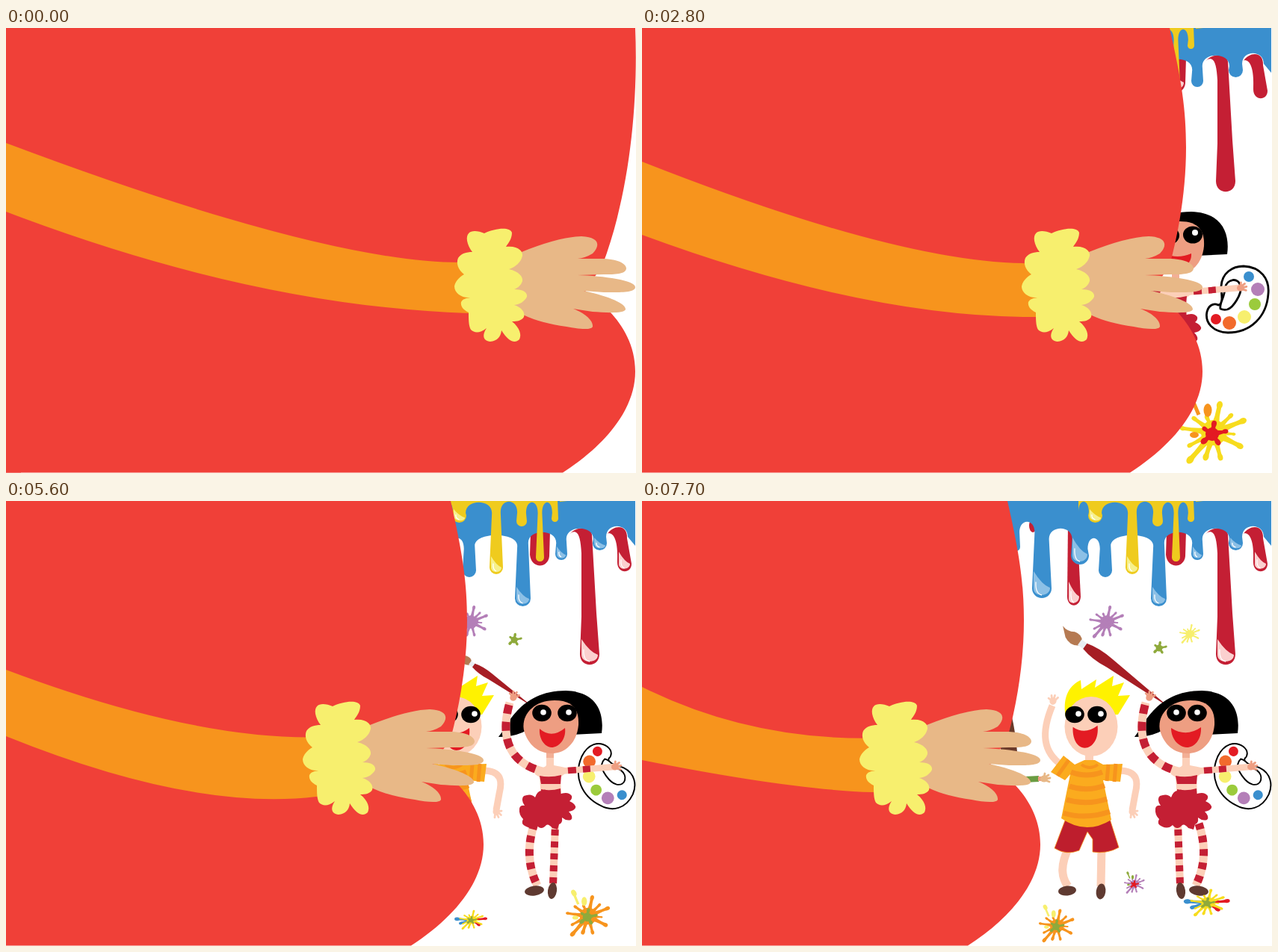
Recreate the animation shown at these times as an HTML page. Size 843 by 596 pixels, loop 8000 ms.

```html
<!DOCTYPE html>
<html lang="en">
<head>
<meta charset="utf-8">
<title>Paint party</title>
<style>
  html, body { margin: 0; width: 100%; height: 100%; overflow: hidden; background: #fff; }
  svg { display: block; width: 843px; height: 596px; }
</style>
</head>
<body>
<svg id="stage" viewBox="0 0 843 596"></svg>
<script>
const STEP = 700, LOOP = 8000;
const RED = '#c41f34', PINK = '#fccfb8', SKIN = '#ee9e82', BROWN = '#5f3a31';
const BLUE = '#3a8fce', YELLOW = '#efcb1e', ORANGE = '#f7941d', LEMON = '#f7ef6e';
const PURPLE = '#b47fb8', GREEN = '#8faa3c', LIP = '#e31b23', SUN = '#f7dc1e';

const shifts = [0, -30, -60, -92, -92, -155, -155, -203, -203, -253, -281, -309];
// Sleeve per shift: top y, top bend x, bottom y, bottom bend x and y, bottom end y
const sleeves = {
  0: [154, 425, 246, 330, 372, 382],
  30: [159, 400, 255, 315, 376, 383],
  60: [165, 375, 264, 300, 380, 384],
  92: [179, 345, 277, 300, 388, 387],
  155: [205, 285, 301, 290, 412, 391],
  203: [226, 240, 315, 250, 416, 396],
  253: [246, 192, 336, 210, 405, 394],
  281: [248, 165, 342, 205, 395, 392],
  309: [249, 138, 347, 200, 387, 390]
};

const fill = (d, c, more = '') => `<path d="${d}" fill="${c}" ${more}/>`;
const line = (d, c, w, more = '') =>
  `<path d="${d}" fill="none" stroke="${c}" stroke-width="${w}" ${more}/>`;
const oval = (x, y, rx, ry, c, turn = 0) =>
  `<ellipse cx="${x}" cy="${y}" rx="${rx}" ry="${ry}" fill="${c}" transform="rotate(${turn} ${x} ${y})"/>`;
const dot = (x, y, r, c) => oval(x, y, r, r, c);
const group = (t, s) => `<g transform="${t}">${s}</g>`;
const striped = (d, w, c, dash, from = 0) =>
  line(d, PINK, w) + line(d, c, w, `stroke-dasharray="${dash}" stroke-dashoffset="${from}"`);
const hand = (x, y, turn, c) => group(`translate(${x} ${y}) rotate(${turn})`,
  oval(0, 0, 5, 4.5, c) +
  line('M0,-2L1,-7M1,-2L6,-5M2,0L8,-1M2,2L7,4', c, 2.8, 'stroke-linecap="round"'));

// A row of drips, each [left, right, tip, height of the arch before it]
function drips(start, list, end, arch, endY, c) {
  let d = `M${start},0`, x = start;
  const bend = (to, a) => `L${x},${a + 14}C${x},${a - 5} ${to},${a - 5} ${to},${a + 14}`;
  for (const [l, r, tip, a] of list) {
    const h = (r - l) / 2, flare = (tip - a) / 30;
    d += bend(l + flare, a) + `L${l},${tip - h}A${h},${h} 0 0 0 ${r},${tip - h}`;
    x = r - flare;
  }
  return fill(d + bend(end, arch) + `L${end + 10},${endY}V0Z`, c);
}

function gloss(l, r, tip, h, c) {
  const w = r - l, a = l + 2, b = r - 2;
  return fill(`M${a},${tip - h}Q${l + w * .5},${tip - h * .5} ${b},${tip - h * .38}
    C${b},${tip - 1} ${a},${tip - 1} ${a},${tip - w / 2}Z`, c) +
    line(`M${a + 3},${tip - h * .6}Q${a + 2},${tip - 6} ${l + w * .5},${tip - 4}`, '#fff', 1.3);
}

function paint(i) {
  const red = i < 3 ? '#ed4036' : RED, rose = '#fbd0cf', sky = '#8cc0e6', pale = '#f6f08c';
  const early = i > 2 && i < 8, late = i > 7;
  return oval(523, 33, 5, 9, red) +
    fill('M755,44C760,35 782,33 784,45L790,150L794,205C794,224 768,224 768,205L770,155V70C769,50 766,38 757,42Z', red) +
    fill('M805,44C812,32 832,30 831,50L837,84C837,98 818,98 818,82C819,60 816,42 805,43Z', red) +
    fill('M702,40H728L727,74C725,91 703,91 701,72Z', red) +
    fill('M570,30H582L587,128C586,144 569,143 569,128Z', red) +
    (early ? gloss(702, 727, 86, 34, rose) : '') +
    (late ? gloss(569, 587, 140, 32, rose) + gloss(768, 794, 219, 34, rose) + gloss(818, 837, 94, 26, rose) : '') +
    drips(400, [[495, 506, 67, 40], [522, 548, 130, 28], [574, 598, 85, 37], [611, 629, 102, 50],
      [681, 702, 141, 46], [735, 751, 79, 42], [785, 804, 66, 37]], 832, 34, 60, BLUE) +
    (late ? gloss(522, 548, 130, 36, sky) + gloss(574, 598, 85, 36, sky) + gloss(681, 702, 141, 26, sky) +
      gloss(735, 751, 79, 18, sky) + gloss(785, 804, 66, 17, sky) : '') +
    drips(584, [[597, 616, 29, 1], [647, 665, 98, 2], [683, 697, 34, 1], [709, 720, 81, 2],
      [730, 739, 28, 2]], 741, -13, 0, YELLOW) +
    (i > 2 ? gloss(597, 616, 29, 18, pale) + gloss(647, 665, 98, 24, pale) : '');
}

function eyes(x1, x2, y, r) {
  return [x1, x2].map(x => oval(x, y, 12.8, 11.2, '#000') + dot(x + r, y - 1, 3.8, '#fff')).join('');
}

function brush(turn, size, x, y) {
  return group(`translate(${x} ${y}) rotate(${turn}) scale(${size})`,
    fill('M-114,-3Q-108,-1 -102,-5Q-95,-7 -92,-2V3Q-98,8 -106,4Z', '#b57a52') +
    fill('M-93,-3H-85V3H-93Z', '#e8edf2') +
    fill('M-87,-3Q-75,-6.5 -60,-5L0,-.5V.5L-60,4Q-75,6 -87,3Z', '#a61d24'));
}

function palette(place, w) {
  const spots = [[812, 333, 7, BLUE], [824, 350, 9, PURPLE], [820, 370, 8, '#9bcb3c'],
    [806, 387, 9, LEMON], [786, 395, 9, '#f26a2c'], [768, 390, 7, LIP]];
  const edge = `stroke="#000" stroke-width="${w}"`;
  return group(place + ' translate(-797 -363)',
    fill('M775,346C776,328 790,319 805,319C828,320 840,336 838,356C836,386 815,408 784,408C763,407 753,394 756,380C759,369 767,369 771,371C779,371 775,357 775,346Z', '#fff', edge) +
    fill('M774,376C772,368 780,361 780,348C783,336 798,333 801,346C803,356 791,375 783,377Q778,378 774,376Z', '#fff', edge) +
    spots.map(s => dot(...s)).join(''));
}

function girl(i) {
  const red = i < 3 ? '#ed4036' : RED, late = i > 7, glad = i > 5, last = i === 11;
  const stick = last ? [36, 1.48, 683, 262] : late ? [35, 1, 683, 262] : glad ? [81, 1, 667, 275] : [52, 1, 682, 273];
  const board = late ? 'translate(790 362) rotate(113) scale(.93)'
    : i < 3 ? 'translate(802 368) rotate(26) scale(.74)' : 'translate(797 363)';
  const legs = glad
    ? striped('M693,424C686,445 681,475 697,507', 11, red, '9 9', -17) + striped('M721,424L718,506', 10, red, '8 8', -8) +
      oval(693, 514, 13, 6.5, BROWN, -8) + oval(717, 514, 6, 11, BROWN, 8)
    : striped('M690,424C688,455 683,485 688,512', 11, red, '9 9', -17) + striped('M717,424L713,507', 10, red, '8 8', -8) +
      oval(684, 519, 13, 6.5, BROWN, -6) + oval(712, 516, 6, 11, BROWN, 8);
  const mouth = last ? 'M694,296Q714,309 734,295C735,312 725,322 715,322C703,321 694,310 694,296Z'
    : glad ? 'M700,297Q716,311 734,296C736,312 725,322 716,322C706,321 699,310 700,297Z'
    : 'M700,302Q716,310 735,302C736,314 727,321 716,321C705,320 698,312 700,302Z';
  return group(late ? 'translate(14 8)' : '',
    brush(...stick) +
    group(last ? 'translate(1424 0) scale(-1 1)' : '', legs) +
    fill('M709,322H719V346Q730,348 734,349V357L728,362L729,390H702L700,362L694,358V350Q707,350 709,346Z', PINK) +
    fill('M709,322H719V336H709Z', '#f3af95') +
    fill('M700,360Q714,363 729,359L728,371H702ZM702,378Q714,381 728,377L729,390H702Z', red) +
    fill('M645,308C656,296 672,246 735,246C776,247 787,275 783,303L742,305L700,290L677,302Q663,308 645,308Z', '#000') +
    fill('M679,299C675,279 692,259 720,259C745,259 753,272 752,292C750,315 735,330 716,330C698,330 684,318 679,299Z', SKIN) +
    (last ? eyes(701, 729, 276, -3 + 3) : glad ? eyes(703, 737, 276, 2) :
      oval(706, 278, 13, 11.5, '#000') + oval(737, 277, 13, 11.5, '#000') + dot(700, 277, 2, '#fff') + dot(740, 274, 4, '#fff')) +
    fill(mouth, LIP) +
    striped('M704,354C675,347 642,325 660,262', 11, red, '12 11', -10) +
    hand(665, 255, -50, SKIN) +
    fill('M703,380Q708,376 713,382Q720,379 726,385Q738,380 743,387Q744,391 740,394Q749,398 748,403Q746,407 739,408Q746,415 742,419Q736,421 730,416Q731,424 726,425L724,432L717,430Q712,424 709,426Q702,434 696,426Q690,432 682,428Q674,425 678,418Q672,412 673,404Q674,399 680,400Q674,391 679,387Q689,383 694,389Q697,380 703,380Z', red) +
    palette(board, i > 2 && i < 7 ? 2.8 : 2.1) +
    striped('M726,354L800,348', 8.5, red, '11 9 10 99', -12) +
    hand(801, 348, -5, SKIN));
}

function boy(i) {
  const moved = i > 9, dx = moved ? -13 : 0, cloth = '#fbab1e';
  return line('M562,354C536,336 534,310 549,274', PINK, 9) + hand(550, 268, -65, PINK) +
    line('M638,361C664,361 664,376 660,392L656,414', PINK, 9) + hand(656, 416, 75, PINK) +
    line('M572,462C558,490 562,505 570,516', PINK, 11) + line('M615,462L614,516', PINK, 11) +
    oval(moved ? 569 : 575, moved ? 522 : 518, 12, 6.5, BROWN, -6) +
    oval(moved ? 614 : 611, moved ? 523 : 520, 6.3, 10.5, BROWN, 8) +
    fill('M566,428L552,465Q568,475 585,468L596,443L603,453V470Q622,473 638,464L626,426Z', '#be1e2d', `stroke="${ORANGE}" stroke-width=".8"`) +
    fill('M593,335H604V352H593Z', PINK) +
    fill('M592,347H606L617,353L643,352L640,376L617,374L628,427Q594,448 561,425L573,366L566,374L547,363L564,341L579,353Z', cloth) +
    line('M574,363Q595,371 616,363M572,382Q595,390 619,381M568,400Q595,408 622,399M564,418Q594,427 626,416', ORANGE, 7) +
    line('M571,347L556,368M624,353L622,375M634,352L632,376', ORANGE, 5) +
    line('M588,353Q599,361 610,353', ORANGE, 4) +
    fill('M567,290C562,262 572,247 587,240L588,252L608,239L606,250L631,234L629,248L645,243L637,261L653,260L637,286Z', '#fff200') +
    oval(601, 302, 35.5, 40, PINK) +
    eyes(592 + dx, 622 + dx, 286, 5) +
    fill('M587,306Q603,317 620,304C622,322 613,334 603,334C592,334 586,320 587,306Z', LIP, `transform="translate(${dx * .8} ${dx / 4})"`);
}

// Someone still hidden behind the curtain
const guest = () => fill('M494,285Q500,310 502,336H480V285Z', '#6b3a2a') +
  fill('M512,369L531,368V376L512,377Z', '#6a9c42') + line('M530,372L537,372', SKIN, 6) + hand(538, 372, 0, '#e8b887');

// Splat arms: angle, length, bead radius
const rays = [[-78, 38, 4], [-45, 32, 3], [-22, 42, 4], [4, 27, 2], [27, 39, 4], [75, 34, 3.5],
  [108, 34, 4], [131, 48, 4.5], [152, 36, 3], [188, 42, 3], [216, 32, 3], [246, 22, 3]];
const star = [[-80, 14, 3.5], [-12, 18, 3], [55, 13, 3.5], [140, 14, 4], [215, 12, 3]];

function burst(list, r, w, c) {
  return dot(0, 0, r, c) + list.map(([a, l, end]) => group(`rotate(${a})`,
    fill(`M0,${-w}Q${l * .5},-1.5 ${l},${-end * .8}V${end * .8}Q${l * .5},1.5 0,${w}Z`, c) +
    oval(l, 0, end * 1.3, end, c))).join('');
}

function splat(x, y, s, main, core, blob) {
  return group(`translate(${x} ${y}) scale(${s})`,
    burst(rays, 17, 8, main) +
    group('translate(-2 2)', burst(star, 9, 7, core)) +
    (blob ? oval(-29, -47, 5, 7, blob, -30) + line('M-28,-43L-20,-24', blob, 5) +
      oval(-8, -30, 5.5, 9, blob) + oval(-26, 3, 6, 4, blob) : ''));
}

function confetti(x, y, s) {
  return group(`translate(${x} ${y}) scale(${s} ${s * .85})`,
    burst([[184, 36, 5], [160, 28, 4]], 0, 6, BLUE) + burst([[-6, 34, 4], [38, 22, 4]], 0, 5, LIP) +
    group('scale(.68)', splat(0, 0, 1, SUN, GREEN)));
}

function splats(i) {
  const last = i === 11;
  let s = i < 3 ? splat(765, 542, 1, '#f26a2c', '#fcd81e')
    : i < 7 ? splat(765, 542, 1, SUN, LIP, ORANGE)
    : i < 8 ? splat(765, 542, 1, PURPLE, GREEN, LEMON)
    : last ? splat(555, 569, .53, ORANGE, GREEN, LEMON)
    : splat(779, 556, .66, ORANGE, GREEN, LEMON);
  if (i > 3) s += last ? confetti(757, 538, .76) : confetti(623, 561, .54);
  if (i === 7) s += confetti(654, 148, .51);
  if (i > 7) s += splat(622, 162, .52, PURPLE, PURPLE) +
    group(`translate(${last ? '692 197' : '680 186'}) scale(.5)`, burst(star, 9, 7, GREEN));
  if (last) s += splat(733, 178, .31, LEMON, LEMON) + splat(659, 513, .31, PURPLE, LIP, GREEN);
  return s;
}

function curtain(i) {
  const d = shifts[i], x = n => n + d;
  const [ty, tx, by, bx, bend, end] = sleeves[-d], top = 314 - d / 80;
  const edge = i ? 'H798C814,70 820,110 820,160C820,215 811,270 798,318' : 'H842C846,100 835,220 798,318';
  const red = i === 2 ? '#ed4036' : '#f04038';
  return group(`translate(${d} 0)`,
      fill(`M-10,0${edge}L775,352L808,380C825,398 842,425 842,460C842,512 800,560 745,595.5H-10Z`, red)) +
    fill(`M0,0H${x(20)}V595.5H0Z`, red) +
    fill(`M0,${ty}Q${tx},${top} ${x(608)},${top}H${x(640)}V${end}H${x(618)}Q${bx},${bend} 0,${by}Z`, ORANGE) +
    group(`translate(${d} 0)`,
      fill('M670,308L690,300Q740,280 770,279C795,280 795,292 785,302Q775,308 765,309L800,309C822,310 830,317 830,322C829,330 815,330 800,330L765,331C800,332 842,338 842,347C842,355 820,354 800,354L773,352C810,360 830,370 829,377C827,383 800,381 785,380L759,376C775,382 786,392 785,400C783,405 765,403 750,400Q715,395 694,385L670,375Z', '#e8b887') +
      fill('M617,285C615,270 628,270 640,275C655,268 674,266 677,274C677,283 672,288 669,293C685,291 692,299 691,305C689,314 682,320 673,323C686,326 692,333 691,339C689,345 685,348 680,350C692,350 698,354 697,360C694,366 688,370 680,371C690,374 695,381 693,387C690,392 684,393 677,393C688,402 690,411 687,417C680,424 671,418 663,405C662,414 657,419 648,420C638,419 637,411 643,402C634,409 627,409 622,404C619,399 619,390 619,381C611,377 608,372 609,367C611,363 615,362 621,361C610,362 600,355 600,346C601,340 606,334 613,330C605,324 602,315 605,308C609,302 616,300 624,300C620,295 618,290 617,285Z', LEMON));
}

// The first step shows the closed curtain alone
const scene = i => (i ? paint(i) + (i > 9 ? guest() : '') + boy(i) + girl(i) + splats(i) : '') + curtain(i);

const stage = document.getElementById('stage');
const begin = performance.now();
let shown = -1;

function tick() {
  const i = Math.floor(((performance.now() - begin) % LOOP) / STEP);
  if (i !== shown) {
    shown = i;
    stage.innerHTML = scene(i);
  }
  requestAnimationFrame(tick);
}
tick();
</script>
</body>
</html>
```
